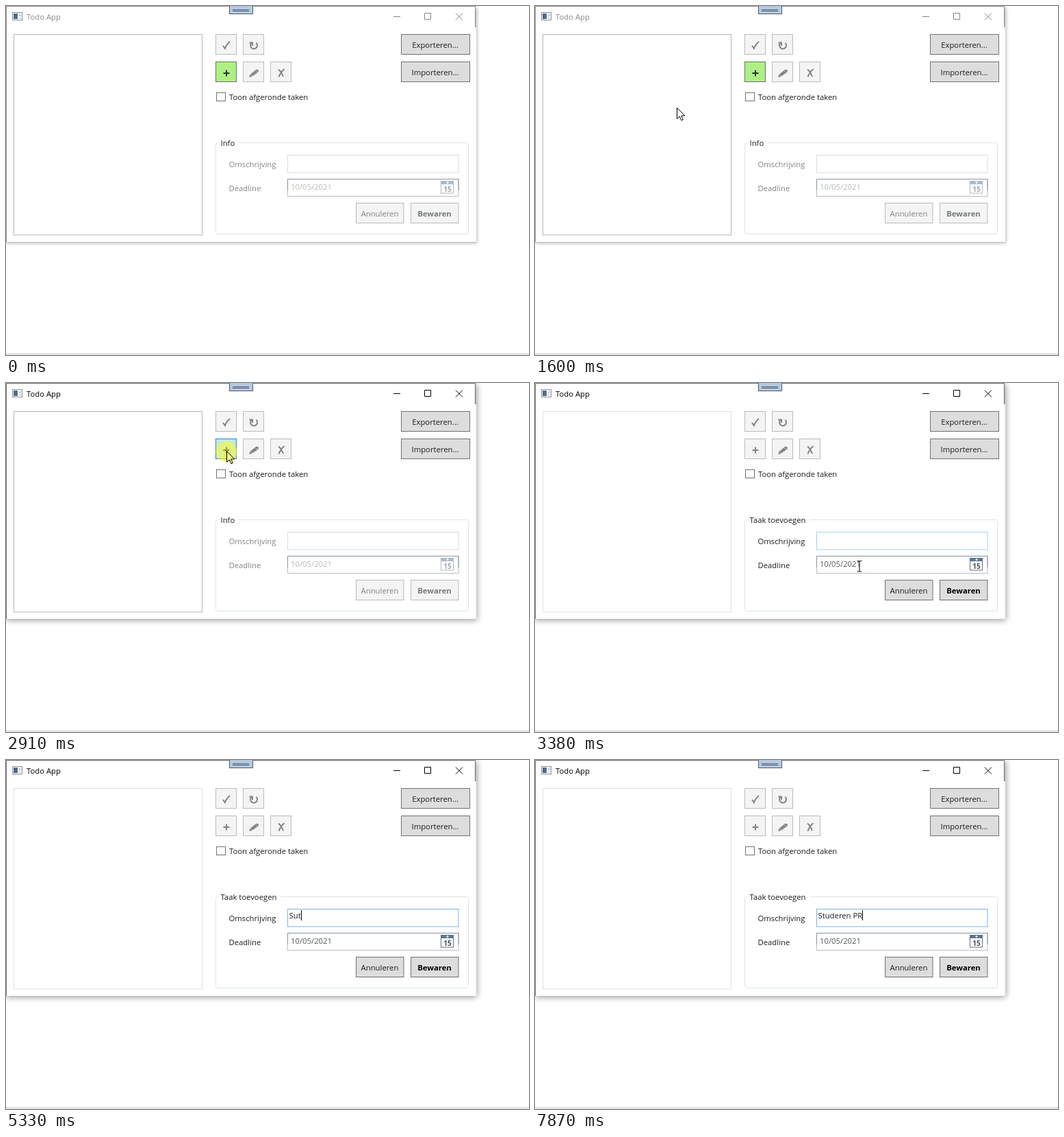
An HTML page that plays this animation: 764x509 px, repeating every 8000 ms.

```html
<!DOCTYPE html>
<html lang="nl">
<head>
<meta charset="utf-8">
<title>Todo App</title>
<style>
  html, body { margin: 0; width: 100%; height: 100%; overflow: hidden; background: #fff; }
  svg { display: block; width: 764px; height: 509px; }
  text { font: 11.3px "Open Sans", "Noto Sans", sans-serif; fill: #1c1c1c; white-space: pre; }
  .mid { text-anchor: middle; }
  .bold { font-weight: 700; }
  .line { fill: none; stroke: #999; }
  .title { fill: #8c8c8c; }
  .active .title { fill: #000; }
  .ctl { fill: none; stroke: #858585; }
  .active .ctl { stroke: #000; }
  .edge { fill: none; stroke: #8b8b8b; }
  .active .edge { stroke: #6c6c6c; }
  .shade { fill: #000; opacity: .3; filter: url(#soft); }
  .active .shade { opacity: .4; filter: url(#wide); }
  .btn { fill: #ddd; stroke: #707070; }
  .off { fill: #f4f4f4; stroke: #b8bbbd; }
  .glyph { fill: none; stroke: #838383; stroke-width: 2; }
  .list { fill: #fff; stroke: #b3b5b9; }
  .edit .list { stroke: #dfe2e4; }
  .add { fill: #adf083; stroke: #707070; }
  .hover .add { fill: #bee6fd; stroke: #3c7fb1; }
  .plus { stroke: #303030; }
  .edit .add { fill: #f4f4f4; stroke: #b8bbbd; }
  .edit .plus { stroke: #838383; }
  .form text { fill: #838383; }
  .edit .form text { fill: #1c1c1c; }
  .form .btn { fill: #f4f4f4; stroke: #b8bbbd; }
  .edit .form .btn { fill: #ddd; stroke: #707070; }
  .form .date { fill: #b9b9b9; }
  .edit .form .date { fill: #555; }
  .form .bold { fill: #757a7a; }
  .edit .form .bold { fill: #000; }
  .cal { opacity: .5; }
  .edit .cal { opacity: 1; }
  .box { fill: #fff; stroke: #d7dadd; }
  .edit .box { stroke: #a3cff0; }
  .focus .box { stroke: #78b2e8; }
</style>
</head>
<body>
<svg id="stage" viewBox="0 0 764 509" xmlns="http://www.w3.org/2000/svg">
  <defs>
    <filter id="soft" x="-5%" y="-10%" width="110%" height="120%"><feGaussianBlur stdDeviation="2.5"/></filter>
    <filter id="wide" x="-5%" y="-10%" width="110%" height="120%"><feGaussianBlur stdDeviation="5"/></filter>
  </defs>
  <rect width="764" height="509" fill="#fff"/>
  <rect y="506" width="764" height="3" fill="#e7e7e7"/>

  <rect class="shade" x="0" y="2" width="688" height="344"/>
  <rect width="686" height="40" fill="#fff"/>
  <rect y="31" width="687" height="313" fill="#fff"/>
  <path class="edge" d="M.5 344V.5H685.5V31"/>

  <rect x="9.5" y="9.5" width="14" height="11" fill="#fff" stroke="#8a8d92"/>
  <rect x="11" y="11" width="6" height="8" fill="#4d6a8c"/>
  <path d="M19.5 12v3M21.5 12v3M19 17.5h3" stroke="#a9adb3"/>
  <text class="title" x="30" y="20">Todo App</text>
  <path class="ctl" d="M566 15.5h10M611.5 10.5h9v9h-9zM657 10.500l10 10M667 10.500l-10 10"/>

  <rect x="326.500" y="-.5" width="34" height="12" fill="#b6c9df" stroke="#4d5a70"/>
  <path d="M331 5.500h24M331 7.500h24" stroke="#4b5a70"/>

  <rect class="list" x="11.500" y="41.500" width="275" height="292.500"/>
  <g id="tools"></g>
  <rect class="add" x="306.500" y="81.500" width="30" height="29"/>
  <path class="glyph plus" d="M317.500 98h9M322 93.500v9"/>
  <path class="glyph" d="M317 58l3 4q2-6 7-10" stroke-width="2.600"/>
  <path class="glyph" d="M359 53.500A5 5 0 1 0 365.500 53.800M355.500 53.500h4.500v4.500"/>
  <path d="M355 104l1.500-4 9-7.500 3.500 1-.5 3-9.500 6.500z" fill="#858585"/>
  <path d="M358 100.500l2 2.500M364.500 94.500l2.500 3" stroke="#ddd" stroke-width=".8"/>
  <path class="glyph" d="M398 92.500q4 3 7 10.500M406.500 92q-5 4-8 11.500"/>

  <rect class="btn" x="577.500" y="41.500" width="100" height="29"/>
  <text class="mid" x="627" y="61">Exporteren...</text>
  <rect class="btn" x="577.500" y="81.500" width="100" height="29"/>
  <text class="mid" x="627" y="101">Importeren...</text>

  <rect x="307.500" y="126.500" width="13" height="12" fill="#fff" stroke="#707070"/>
  <text x="326" y="137">Toon afgeronde taken</text>

  <rect class="line" x="306.500" y="199.500" width="369" height="133" rx="3" style="stroke:#dce4e8"/>
  <rect id="gap" x="311" y="196" width="28" height="8" fill="#fff"/>
  <text id="caption" x="313.500" y="204">Info</text>

  <g class="form">
    <text x="325.500" y="235">Omschrijving</text>
    <text x="325.500" y="270">Deadline</text>
    <rect class="box" x="411.500" y="217.500" width="249.500" height="25.500"/>
    <rect x="411.500" y="252.500" width="249.500" height="25" fill="#fff" stroke="#b8bcc3"/>
    <path d="M411.500 269V252.500H661V269" fill="none" stroke="#8791a4"/>
    <text class="date" x="416" y="268">10/05/2021</text>
    <g class="cal">
      <rect x="635.500" y="255.500" width="18" height="17.500" fill="#fff" stroke="#66717f"/>
      <rect x="635" y="255" width="19" height="5" fill="#5a7792"/>
      <circle cx="645" cy="257.500" r="1.500" fill="#fff"/>
      <text class="mid" x="645" y="270.500" style="font:700 10px 'Open Sans',sans-serif;fill:#444c55">15</text>
    </g>
    <rect class="btn" x="511.500" y="287.500" width="69.500" height="29"/>
    <text class="mid" x="546" y="307">Annuleren</text>
    <rect class="btn" x="591.500" y="287.500" width="69.500" height="29"/>
    <text class="mid bold" x="626" y="307">Bewaren</text>
    <text id="entry" x="413.500" y="231"></text>
  </g>
  <rect id="caret" y="219" width="1" height="15" fill="#000"/>

  <circle id="glow" r="15.500" fill="#ff0" opacity=".5"/>
  <path id="arrow" d="M.5.5V16.500L4.200 13 6.800 18.800 9.300 17.700 6.700 12H11.800Z" fill="#fff" stroke="#000"/>
  <path id="beam" d="M-3.500-7.500h2.500l1 1 1-1h2.500M0-6.500V7M-3.500 8h2.500l1-1 1 1h2.500" fill="none" stroke="#222" stroke-width="1.200"/>
</svg>
<script>
const LOOP = 8000;
const $ = id => document.getElementById(id);
const stage = $("stage");
const pen = document.createElement("canvas").getContext("2d");

$("tools").innerHTML = [[306, 41], [346, 41], [346, 81], [386, 81]]
  .map(([x, y]) => `<rect class="off" x="${x + .5}" y="${y + .5}" width="30" height="29"/>`).join("");

// Pointer legs: start, end, steps, from x, y, to x, y
const legs = [
  [510, 650, 3, 804, 540, 325, 337],
  [980, 1330, 6, 325, 337, 197, 150],
  [1600, 2370, 11, 197, 150, 302, 123],
  [2440, 2580, 3, 302, 123, 322, 99],
  [3240, 3240, 1, 322, 99, 308, 115],
  [3310, 3380, 2, 326, 173, 474, 267],
  [3490, 3730, 5, 474, 267, 479, 240]
];

const typing = [
  [0, ""], [5060, "S"], [5260, "Su"], [5330, "Sut"],
  [6130, "Su"], [6260, "S"], [6390, "St"], [6460, "Stu"], [6660, "Stue"],
  [6990, "Stu"], [7060, "Stud"], [7130, "Stude"], [7260, "Studer"],
  [7330, "Studere"], [7460, "Studeren"], [7540, "Studeren "],
  [7800, "Studeren P"], [7870, "Studeren PR"]
];

const within = (t, a, b) => t >= a && t < b;
const show = (el, on) => el.setAttribute("visibility", on ? "visible" : "hidden");
const place = (el, x, y) => el.setAttribute("transform", `translate(${x} ${y})`);
const latest = (list, t) => list.filter(item => item[0] <= t).pop();

function pointer(t) {
  const leg = latest(legs, t);
  if (!leg) return [-50, -50];
  const [a, b, n, x0, y0, x1, y1] = leg;
  const done = b > a ? Math.min(1, (t - a) / (b - a)) : 1;
  const k = (Math.floor(done * (n - 1) + 1e-6) + 1) / n;
  return [Math.round(x0 + (x1 - x0) * k), Math.round(y0 + (y1 - y0) * k)];
}

function draw(t) {
  const edit = t >= 2980;
  const press = within(t, 2910, 2980);
  const click = within(t, 3980, 4180);
  stage.classList.toggle("active", t >= 2910);
  stage.classList.toggle("edit", edit);
  stage.classList.toggle("hover", within(t, 2580, 2980));
  stage.classList.toggle("focus", t >= 4180);
  $("caption").textContent = edit ? "Taak toevoegen" : "Info";
  $("gap").setAttribute("width", edit ? 90 : 28);

  const text = latest(typing, t)[1];
  $("entry").textContent = text;
  pen.font = '11.3px "Open Sans", "Noto Sans", sans-serif';
  $("caret").setAttribute("x", Math.round(413.5 + pen.measureText(text).width));
  show($("caret"), t >= 4180 && !within(t, 4780, 5060) && !within(t, 5930, 6130));

  const [x, y] = pointer(t);
  place($("arrow"), x, y);
  place($("beam"), x, y);
  place($("glow"), press ? x : x - 2, press ? y + 1 : y - 1);
  $("arrow").setAttribute("fill", press ? "#f2f28a" : "#fff");
  show($("arrow"), within(t, 510, 3380));
  show($("beam"), within(t, 3380, 5060));
  show($("glow"), press || click);
}

const start = performance.now();
function tick() {
  draw((performance.now() - start) % LOOP);
  requestAnimationFrame(tick);
}
tick();
</script>
</body>
</html>
```
